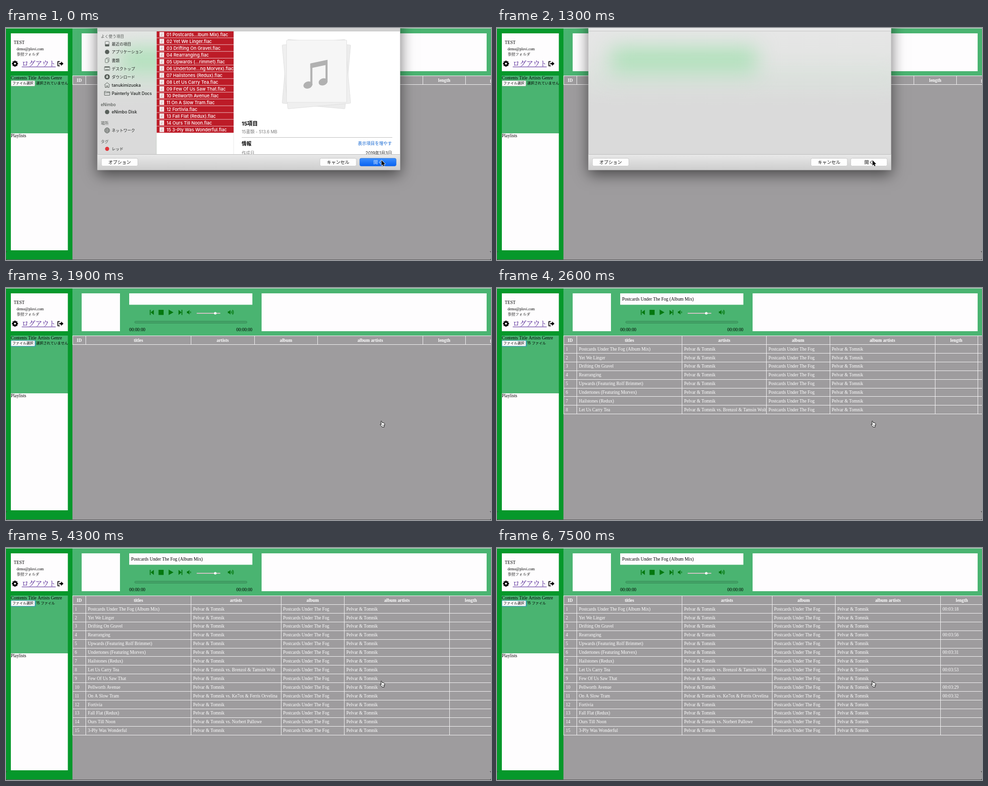
Animation, 1000 px wide and 478 px high, one loop 7.6 s. Source, as an HTML page with a canvas:

```html
<!DOCTYPE html>
<html lang="ja">
<head>
<meta charset="utf-8">
<title>Music library upload</title>
<style>
html, body { margin: 0; width: 100%; height: 100%; overflow: hidden; background: #9e9c9e; }
canvas { display: block; width: 1000px; height: 478px; }
</style>
</head>
<body>
<canvas id="stage" width="1000" height="478"></canvas>
<script>
const ctx = document.getElementById('stage').getContext('2d');
const LOOP = 7600, STEP = 100;
const BLANK_AT = 1000, SLIDE_AT = 1500, SLIDE_END = 1800;
const FILL_AT = 2300, ROW_MS = 40;

const SERIF = '"Liberation Serif", "Noto Serif CJK JP", "Noto Sans CJK JP", serif';
const SANS = 'Inter, "Noto Sans CJK JP", sans-serif';
const SEA = '#4ab471', GREEN = '#06982b', ICON = '#04780f', PAPER = '#fefdfe';

const ALBUM = 'Postcards Under The Fog';
const BAND = 'Pelvar & Tomnik';
const titles = [
  ALBUM + ' (Album Mix)', 'Yet We Linger', 'Drifting On Gravel', 'Rearranging',
  'Upwards (Featuring Rolf Brimmet)', 'Undertones (Featuring Morvex)', 'Hailstones (Redux)',
  'Let Us Carry Tea', 'Few Of Us Saw That', 'Pellworth Avenue', 'On A Slow Tram',
  'Fortivia', 'Fall Flat (Redux)', 'Ours Till Noon', '3-Ply Was Wonderful'
];
const shortNames = { 0: 'Postcards...lbum Mix)', 4: 'Upwards (...rimmet)', 5: 'Undertone...ng Morvex)' };
const guests = { 7: 'Brenzol & Tamsin Wolt', 10: 'Ke7ox & Ferris Orvelina', 13: 'Norbert Pallowe' };

// seconds per row; decoding time grows with track length
const seconds = { 0: 198, 9: 209, 5: 211, 10: 212, 7: 233, 3: 236 };
const decodedAt = s => 4700 + (s - 198) * 73;
const clock = s => `00:${String(Math.floor(s / 60)).padStart(2, '0')}:${String(s % 60).padStart(2, '0')}`;

const rowsAt = t => Math.max(0, Math.min(15, Math.floor((t - FILL_AT) / ROW_MS) + 1));

function rect(x, y, w, h, fill) {
  ctx.fillStyle = fill;
  ctx.fillRect(x, y, w, h);
}

function round(x, y, w, h, r, fill, stroke) {
  ctx.beginPath();
  ctx.roundRect(x, y, w, h, r);
  if (fill) { ctx.fillStyle = fill; ctx.fill(); }
  if (stroke) { ctx.strokeStyle = stroke; ctx.lineWidth = 0.8; ctx.stroke(); }
}

function text(str, x, y, size, { family = SERIF, color = '#000', weight = 400, align = 'left' } = {}) {
  ctx.font = `${weight} ${size}px ${family}`;
  ctx.textAlign = align;
  ctx.fillStyle = color;
  ctx.fillText(str, x, y);
}

function poly(points, fill, stroke, width = 1, open = false) {
  ctx.beginPath();
  points.forEach(([x, y]) => ctx.lineTo(x, y));
  if (!open) ctx.closePath();
  if (fill) { ctx.fillStyle = fill; ctx.fill(); }
  if (stroke) { ctx.strokeStyle = stroke; ctx.lineWidth = width; ctx.stroke(); }
}

function disc(x, y, r, fill, stroke) {
  ctx.beginPath();
  ctx.arc(x, y, r, 0, Math.PI * 2);
  if (fill) { ctx.fillStyle = fill; ctx.fill(); }
  if (stroke) { ctx.strokeStyle = stroke; ctx.lineWidth = 1; ctx.stroke(); }
}

function arc(x, y, r, spread, color, width) {
  ctx.beginPath();
  ctx.arc(x, y, r, -spread, spread);
  ctx.strokeStyle = color;
  ctx.lineWidth = width;
  ctx.stroke();
}

function vertical(y0, y1, ...colors) {
  const g = ctx.createLinearGradient(0, y0, 0, y1);
  colors.forEach((c, i) => g.addColorStop(i / (colors.length - 1), c));
  return g;
}

function gear(x, y) {
  for (let i = 0; i < 8; i++) {
    ctx.save();
    ctx.translate(x, y);
    ctx.rotate(i * Math.PI / 4);
    rect(-1.5, -6.2, 3, 4, '#000');
    ctx.restore();
  }
  disc(x, y, 4.7, '#000');
  disc(x, y, 2, PAPER);
}

function logoutIcon() {
  ctx.lineJoin = 'round';
  poly([[111, 69], [107, 69], [107, 78], [111, 78]], null, '#000', 1.7, true);
  poly([[110, 72], [113.5, 72], [113.5, 69], [118.5, 73.5], [113.5, 78], [113.5, 75], [110, 75]], '#000');
  ctx.lineJoin = 'miter';
}

function sidebar(t) {
  rect(0, 0, 137, 478, GREEN);
  rect(10, 11, 117.5, 78, PAPER);
  text('TEST', 16, 33, 9.36);
  text('demo@plovi.com', 22, 45.5, 7.8);
  text('参照フォルダ', 22, 56.6, 7.75);
  gear(18.5, 73.5);
  text('ログアウト', 32.5, 78.3, 14, { color: '#4a1a90', weight: 300 });
  rect(32.5, 79.6, 70, 1, '#4a1a90');
  logoutIcon();

  rect(10, 98, 117.5, 119, SEA);
  rect(10, 217, 117.5, 241, PAPER);
  text('Contents Title Artists Genre', 10, 106, 9.36);
  text('Playlists', 10, 225, 9.36);

  const focused = t >= SLIDE_END;
  if (focused) round(9.5, 107.5, 52, 13.5, 2, '#2f9fa8');
  round(10.5, 108.4, 49, 11.4, 1, PAPER, focused ? '#6aa9ae' : '#8fae9a');
  text('ファイル選択', 13, 116.3, 7.25, { family: SANS });
  text(t >= FILL_AT ? '15 ファイル' : '選択されていません', 62.3, 116.3, 7.3, { family: SANS });
}

function speaker(x) {
  poly([[x, 48], [x + 2.3, 48], [x + 5.3, 45.3], [x + 5.3, 54.7], [x + 2.3, 52], [x, 52]], ICON);
}

function player(t) {
  rect(137, 0, 863, 98, SEA);
  rect(156, 11, 79, 78, PAPER);
  rect(254, 11, 254, 23.5, PAPER);
  rect(527, 11, 464, 78, PAPER);
  if (t >= FILL_AT) text(titles[0], 258, 26, 9.36);

  rect(296.5, 45, 1.8, 10.5, ICON);
  poly([[304.8, 45], [304.8, 55.5], [298.3, 50.2]], ICON);
  rect(314.5, 45, 10.5, 10.5, ICON);
  poly([[335.3, 44.6], [345.3, 50.2], [335.3, 55.8]], ICON);
  poly([[355.7, 45], [355.7, 55.5], [362, 50.2]], ICON);
  rect(361.8, 45, 1.8, 10.5, ICON);
  speaker(373);
  arc(378.3, 50, 2.5, 0.8, ICON, 1.1);
  speaker(457.5);
  [2.4, 4.6, 6.6].forEach(r => arc(462.5, 50, r, 0.8, ICON, 1.1));

  round(393, 51.2, 49, 1.8, 0.9, '#dcc4cc');
  disc(431.5, 52, 2.6, '#fff');
  round(265.4, 68.4, 231.4, 4, 2, '#45a468', '#2f8551');
  text('00:00:00', 254, 89, 9.36);
  text('00:00:00', 508, 89, 9.36, { align: 'right' });
}

function table(t) {
  const shown = rowsAt(t);
  // the artists column grows with its longest entry
  const grow = shown > 10 ? 55 : shown > 7 ? 43.5 : 0;
  const cols = [137.5, 164.5, 381.5, ...[512, 642.5, 859.5, 947.5].map(x => x + grow)];
  const heads = ['ID', 'titles', 'artists', 'album', 'album artists', 'length'];
  const rowY = i => 116.5 + i * 17.9;
  const line = '#f1f0f1', white = { color: '#fff' }, bold = { color: '#fff', weight: 700 };

  rect(137, 98, 863, 380, '#9e9c9e');
  rect(137, 98, 863, 1, line);
  for (let i = 0; i <= shown; i++) rect(137, Math.round(rowY(i) - 0.5), 863, 1, line);
  cols.forEach(x => rect(Math.floor(x), 98, 1, rowY(shown) - 98, line));

  heads.forEach((h, i) => text(h, (cols[i] + cols[i + 1]) / 2, 110.6, 9.36, { ...bold, align: 'center' }));
  text('genre', 998 + grow, 110.6, 9.36, bold);

  titles.slice(0, shown).forEach((title, i) => {
    const artist = guests[i] ? `${BAND} vs. ${guests[i]}` : BAND;
    const cells = [i + 1, title, artist, ALBUM, BAND];
    if (t >= decodedAt(seconds[i])) cells.push(clock(seconds[i]));
    cells.forEach((s, c) => text(s, cols[c] + 4.3, rowY(i) + 12.1, 9.36, white));
  });
}

function button(label, x, blue) {
  const fill = blue ? vertical(268, 285, '#3d8ffc', '#0661f2') : '#fefefe';
  round(x, 268.4, 75, 16, 3, fill, blue ? '#2f74d8' : '#c2c2c2');
  text(label, x + 37.5, 279.9, 9.3, { family: SANS, align: 'center', color: blue ? '#d3e5ff' : '#111' });
}

function placeIcon(kind, y) {
  const c = '#59605b', x = 208.5;
  const frame = (w, h) => round(x - w / 2, y - h / 2, w, h, 1, null, c);
  if (kind === 'box') { frame(8, 10); rect(x - 4, y + 1, 8, 4, c); }
  if (kind === 'dot') disc(x, y, 4.5, c);
  if (kind === 'docs') { round(x - 2, y - 5, 6, 8, 1, null, c); round(x - 4, y - 3, 6, 8, 1, '#d7e2d9', c); }
  if (kind === 'desk') { frame(11, 8); rect(x - 5, y - 4, 10, 2, c); rect(x - 4, y + 1.5, 8, 1.2, c); }
  if (kind === 'down') {
    disc(x, y, 5.5, c);
    poly([[x - 1, y - 3], [x + 1, y - 3], [x + 1, y], [x + 3, y], [x, y + 3], [x - 3, y], [x - 1, y]], '#e3ebe4');
  }
  if (kind === 'home') {
    poly([[x - 6, y], [x, y - 5], [x + 6, y]], null, c, 1, true);
    poly([[x - 4, y], [x - 4, y + 5], [x - 1, y + 5], [x - 1, y + 1.5], [x + 1, y + 1.5], [x + 1, y + 5], [x + 4, y + 5], [x + 4, y]], null, c, 1, true);
  }
  if (kind === 'folder') {
    poly([[x - 5.5, y - 4], [x - 2, y - 4], [x - 1, y - 3], [x + 5.5, y - 3], [x + 5.5, y + 4], [x - 5.5, y + 4]], null, c);
    rect(x - 5.5, y - 1.5, 11, 0.9, c);
  }
  if (kind === 'net') {
    disc(x, y, 5.3, null, c);
    ctx.beginPath();
    ctx.ellipse(x, y, 2.2, 5, 0, 0, Math.PI * 2);
    ctx.stroke();
    rect(x - 5, y - 0.5, 10, 1, c);
    rect(x - 4.5, y - 3, 9, 0.8, c);
    rect(x - 4.5, y + 2.2, 9, 0.8, c);
  }
  if (kind === 'red') disc(x, y, 4.2, '#e0373c');
}

function places() {
  [['よく使う項目', 16.5], ['eNimbo', 158], ['場所', 196], ['タグ', 233.5]].forEach(([s, y]) =>
    text(s, 195.5, y + 3, s === 'eNimbo' ? 8.3 : 8, { family: SANS, color: '#565b57', weight: 500 }));
  [
    ['box', '最近の項目', 32.5], ['dot', 'アプリケーション', 49.2], ['docs', '書類', 66.5],
    ['desk', 'デスクトップ', 83.5], ['down', 'ダウンロード', 100.5], ['home', 'tanukimizuoka', 117.5],
    ['folder', 'Painterly Vault Docs', 134.5], ['dot', 'eNimbo Disk', 173],
    ['net', 'ネットワーク', 211], ['red', 'レッド', 249]
  ].forEach(([kind, label, y]) => {
    placeIcon(kind, y);
    const latin = label.charCodeAt(0) < 128;
    text(label, 218, y + 3, latin ? 8.6 : 8, { family: SANS, color: '#1f2220', weight: 500 });
  });
}

function files() {
  rect(310, 6.5, 160, 254, '#fff');
  titles.forEach((title, i) => {
    const y = 6.5 + i * 14;
    rect(310.5, y, 159, 13.3, '#bd1b27');
    rect(316.5, y + 1.7, 9.5, 10.3, '#f3e6e7');
    disc(320.4, y + 8.5, 1.1, '#c9b5b7');
    rect(321, y + 4.5, 0.9, 4, '#c9b5b7');
    const name = `${String(i + 1).padStart(2, '0')} ${shortNames[i] || title}.flac`;
    text(name, 331, y + 10.4, 9.2, { family: SANS, color: '#fff', weight: 500 });
  });
  rect(309.5, 6.5, 1, 254, '#c9cfca');
  rect(469.5, 6.5, 1, 254, '#d5d5d5');
}

function sheetOfPaper(x, y, w, h, angle, fill) {
  ctx.save();
  ctx.translate(x, y);
  ctx.rotate(angle);
  round(-w / 2, -h / 2, w, h, 1, fill, '#dedede');
  ctx.restore();
}

function note() {
  const c = '#b1b1b1';
  poly([[627.5, 73], [663, 65.5], [663, 75.5], [627.5, 83]], c);
  rect(627.5, 74, 4.2, 44, c);
  rect(658.8, 67, 4.2, 44, c);
  [[622.5, 117.5], [653.8, 111]].forEach(([x, y]) => {
    ctx.beginPath();
    ctx.ellipse(x, y, 9.5, 7.2, -0.35, 0, Math.PI * 2);
    ctx.fill();
  });
}

function preview() {
  rect(470, 6.5, 342.5, 254, '#fff');
  sheetOfPaper(640, 95, 130, 132, 0.09, '#ececec');
  sheetOfPaper(640, 95, 130, 132, -0.09, '#efefef');
  sheetOfPaper(640.5, 89, 124, 128, 0, '#f6f6f6');
  note();
  const grey = { family: SANS, color: '#7d7d7d' };
  text('15項目', 486, 201.4, 10.8, { family: SANS, weight: 700 });
  text('15書類 - 513.6 MB', 486, 217, 8.8, grey);
  rect(486, 225, 310.5, 0.9, '#bcbcbc');
  text('情報', 486, 241.6, 10, { family: SANS, weight: 700 });
  text('表示項目を増やす', 795.5, 241.3, 8.75, { family: SANS, color: '#1467d2', weight: 500, align: 'right' });
  text('作成日', 486, 261.2, 8.7, grey);
  text('2019年1月3日', 796, 261.2, 8.7, { family: SANS, color: '#222', align: 'right' });
}

// translucent pane with the page showing through
function backdrop() {
  rect(188.5, 6.5, 624, 254, vertical(7, 160, '#e6e6e6', '#e2e4e2', '#dadada'));
  ctx.save();
  ctx.filter = 'blur(20px)';
  rect(235, 40, 300, 54, '#b0e1bb');
  rect(190, 95, 640, 14, 'rgba(200,226,207,.6)');
  ctx.restore();
}

function sheet(t) {
  if (t >= SLIDE_END) return;
  const p = Math.max(0, (t - SLIDE_AT) / (SLIDE_END - SLIDE_AT));
  const blank = t >= BLANK_AT;
  ctx.save();
  ctx.translate(0, -150 * (1 - Math.cos(Math.PI * p)));

  ctx.save();
  ctx.shadowColor = 'rgba(0,0,0,.55)';
  ctx.shadowBlur = 28;
  ctx.shadowOffsetY = 9;
  rect(188.5, -40, 624, 332.5, '#dcdcdc');
  ctx.restore();

  ctx.save();
  ctx.beginPath();
  ctx.rect(188.5, -40, 624, 300.5);
  ctx.clip();
  backdrop();
  if (!blank) { places(); files(); preview(); }
  ctx.restore();

  rect(188.5, -40, 624, 46.5, blank ? '#e8e8e8' : '#d2d2d2');
  rect(188.5, 5.8, 624, 0.8, '#bdbdbd');
  rect(188.5, 260, 624, 32.5, vertical(260, 292, '#e9e9e9', '#cecece'));
  rect(188.5, 260, 624, 0.9, '#b9b9b9');
  button('オプション', 196.8);
  button('キャンセル', 647.3);
  button('開く', 729.4, !blank);
  ctx.restore();
}

function cursor(t) {
  ctx.save();
  ctx.lineJoin = 'round';
  if (t < SLIDE_END) {
    ctx.translate(774.3, 272.5);
    const arrow = [[0, 0], [0, 11], [2.5, 8.8], [4.2, 12.6], [6, 11.8], [4.3, 8], [7.6, 7.8]];
    poly(arrow, null, '#fff', 1.4);
    poly(arrow, '#000');
  } else {
    ctx.translate(771, 273.5);
    poly([[2, 1], [3.2, 0.6], [4.4, 4.2], [5.8, 3.8], [7, 4.5], [8.2, 4.3], [9.5, 5.8], [9.9, 8.5],
      [8.8, 11], [8.8, 13], [4.4, 13], [3, 10.8], [0.4, 8.2], [0.8, 7], [3.1, 8], [1.6, 2.4]], '#fff', '#1a1a1a', 1);
    [5.1, 6.6, 8].forEach(x => rect(x, 8, 0.7, 3, '#444'));
  }
  ctx.restore();
}

// window edge with rounded lower corners
function edge() {
  rect(0, 0, 1000, 1, '#d3dcd6');
  rect(0, 477, 1000, 1, '#5b5b5b');
  ctx.beginPath();
  ctx.rect(0, 470, 1000, 8);
  ctx.roundRect(0, 460, 1000, 18, 4);
  ctx.rect(0, 460, 1000, 10);
  ctx.fillStyle = '#3a3a3a';
  ctx.fill('evenodd');
}

function draw(now) {
  const t = Math.floor(now % LOOP / STEP) * STEP;
  ctx.clearRect(0, 0, 1000, 478);
  sidebar(t);
  player(t);
  table(t);
  edge();
  sheet(t);
  cursor(t);
}

const start = performance.now();
function tick() {
  draw(performance.now() - start);
  requestAnimationFrame(tick);
}
tick();
</script>
</body>
</html>
```
